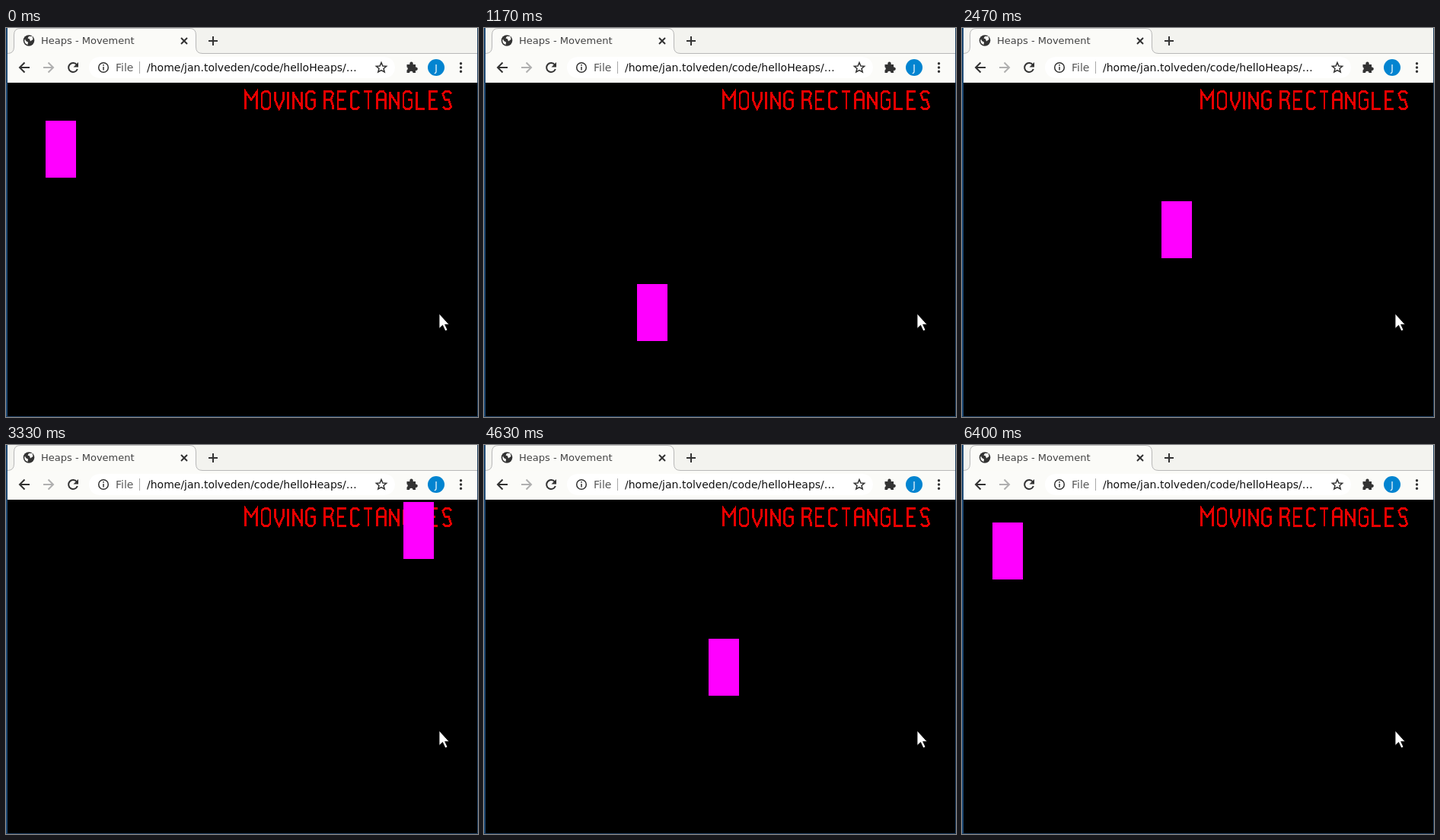
An HTML page that plays this animation: 620 by 512 pixels, repeating every 6710 ms.

```html
<!DOCTYPE html>
<html lang="en">
<head>
<meta charset="utf-8">
<title>Heaps - Movement</title>
<style>
  html, body { margin: 0; width: 100%; height: 100%; overflow: hidden; background: #000; }
  svg { display: block; width: 100%; height: 100%; }
  text { font-family: "DejaVu Sans", sans-serif; font-size: 14px; fill: #111; }
  .icon { fill: none; stroke: #333; stroke-width: 2; }
  .thin { stroke-width: 1.5; }
  .solid { fill: #333; }
  .bar { fill: #fbfbf8; }
</style>
</head>
<body>
<svg viewBox="0 0 620 512">
  <rect width="620" height="512"/>

  <!-- tab strip and toolbar -->
  <rect width="620" height="34" fill="#f3f3ef"/>
  <rect class="bar" y="33" width="620" height="39"/>
  <path class="bar" stroke="#b8b8b8" d="M0 33.5H2Q10.5 33.5 10.5 25V9Q10.5 .5 19 .5H241Q249.500 .5 249.500 9V25Q249.500 33.500 258 33.500H620"/>

  <circle class="solid" cx="30" cy="16.500" r="7.300"/>
  <path class="bar" d="M25 14.500Q26 18 29 18.500L28.500 22Q24 20.500 24.300 16ZM30 11H34.500L35.500 15L32 17.500L31 14.500L28.500 13.500Z"/>
  <text x="46" y="21" style="font-size:13px;fill:#444">Heaps - Movement</text>
  <path class="icon" d="M230 13L238 21M238 13L230 21M266 17H278M272 11V23"/>

  <path class="icon" d="M31 52H18.500M24.500 45.500L18 52L24.500 58.500"/>
  <path class="icon" style="stroke:#b0b0b0" d="M49 52H61.500M55.500 45.500L62 52L55.500 58.500"/>
  <path class="icon" d="M93 48.500A6 6 0 1 0 93.800 54"/>
  <path class="solid" d="M95 45V51.500H88.500Z"/>

  <rect x="109" y="38" width="402" height="28" rx="14" fill="#fff"/>
  <circle class="icon thin" cx="128" cy="52" r="6.300"/>
  <path class="icon thin" d="M128 51V55.500M128 48V49.700"/>
  <text x="144" y="57" style="fill:#5a5a5a">File</text>
  <path d="M175.500 44V60" stroke="#aaa"/>
  <text x="185" y="57">/home/jan.tolveden/code/helloHeaps/…</text>
  <path class="icon thin" d="M493 45.500L494.900 50L499.600 50.300L496 53.400L497.200 58L493 55.500L488.800 58L490 53.400L486.400 50.300L491.100 50Z"/>

  <path class="solid" d="M526.500 48H530.500A2.300 2.300 0 1 1 534.500 48H538V51.500A2.300 2.300 0 1 1 538 56V59H534.500A2.200 2.200 0 0 0 530 59H526.500V55.500A2.200 2.200 0 0 0 526.500 51.500Z"/>
  <circle cx="565" cy="52" r="11" fill="#0284d0"/>
  <text x="565" y="56.500" text-anchor="middle" style="font-size:12px;fill:#fff">J</text>
  <path d="M597.500 46.800v0M597.500 52v0M597.500 57.200v0" stroke="#333" stroke-width="3.400" stroke-linecap="round"/>

  <!-- game area -->
  <g id="heading" role="img" fill="none" stroke="#e80000" stroke-width="2.700" shape-rendering="crispEdges"></g>
  <rect id="box" width="40" height="75" fill="#f0f"/>

  <rect width="2" height="512" fill="#1f4a74"/>
  <path d="M619.500 0V511.500H0" fill="none" stroke="#1f3f60"/>
  <path d="M569 376V395.500L573.500 391.300L577 398.800L580 397.400L576.600 390.300H582Z" fill="#fff" stroke="#000" stroke-width=".8"/>
</svg>
<script>
const LOOP = 6710, TICK = 100 / 3;

// Letters join nodes a-y of a 5 by 5 lattice, read row by row
const COLS = [1, 4, 6.5, 9, 12], ROWS = [1, 4, 12, 21, 24];
const GLYPHS = {
  M: "uamey", O: "bdjtxvpfb", V: "akwoe", I: "au", N: "ua ft ey",
  G: "jdbfpvxtom", R: "uadjnk nty", E: "eauy kn", C: "jdbfpvxt",
  T: "ae cw", A: "ufbdjy ko", L: "auy", S: "jdbflntxvp"
};
const ADVANCE = { M: 22, I: 7, " ": 7 };

function outline(strokes, stretch) {
  const node = c => {
    const n = c.charCodeAt(0) - 97;
    return `${COLS[n % 5] * stretch} ${ROWS[Math.floor(n / 5)]}`;
  };
  return strokes.split(" ").map(s => "M" + [...s].map(node).join("L")).join("");
}

function drawHeading(words, x, y) {
  const group = document.getElementById("heading");
  group.setAttribute("aria-label", words);
  for (const ch of words) {
    const path = document.createElementNS(group.namespaceURI, "path");
    if (GLYPHS[ch]) path.setAttribute("d", outline(GLYPHS[ch], ch === "M" ? 1.4 : 1));
    path.setAttribute("transform", `translate(${x} ${y})`);
    group.append(path);
    x += ADVANCE[ch] || 17.2;
  }
}

// Key poses of the box: tick, x, y
const POSES = [
  [0, 52, 122], [20, 25, 436], [22, 25, 436], [35, 201, 337],
  [46, 280, 240], [61, 127, 127], [74, 262, 228], [90, 460, 62],
  [100, 522, 75], [105, 538, 79], [130, 180, 214], [139, 295, 255],
  [146, 360, 261], [154, 360, 261], [167, 182, 235], [175, 74, 128],
  [188, 40, 102]
];

const slope = (p, q, k) => p && q ? (q[k] - p[k]) / (q[0] - p[0]) : 0;

// Speed at a pose; zero where the direction turns
function speed(i, k) {
  const a = slope(POSES[i - 1], POSES[i], k), b = slope(POSES[i], POSES[i + 1], k);
  return a * b > 0 ? 2 * a * b / (a + b) : 0;
}

function position(tick, k) {
  const i = POSES.findIndex(p => p[0] > tick) - 1;
  if (i < 0) return POSES[POSES.length - 1][k];
  const p = POSES[i], q = POSES[i + 1], span = q[0] - p[0];
  const u = (tick - p[0]) / span, v = 1 - u;
  return p[k] * v * v * (1 + 2 * u) + q[k] * u * u * (1 + 2 * v)
    + span * u * v * (speed(i, k) * v - speed(i + 1, k) * u);
}

const box = document.getElementById("box");

function render(ms) {
  const tick = Math.floor((ms % LOOP + 4) / TICK);
  box.setAttribute("x", Math.round(position(tick, 1)));
  box.setAttribute("y", Math.round(position(tick, 2)));
}

drawHeading("MOVING RECTANGLES", 313, 82.5);
const start = performance.now();
function frame() {
  render(performance.now() - start);
  requestAnimationFrame(frame);
}
frame();
</script>
</body>
</html>
```
